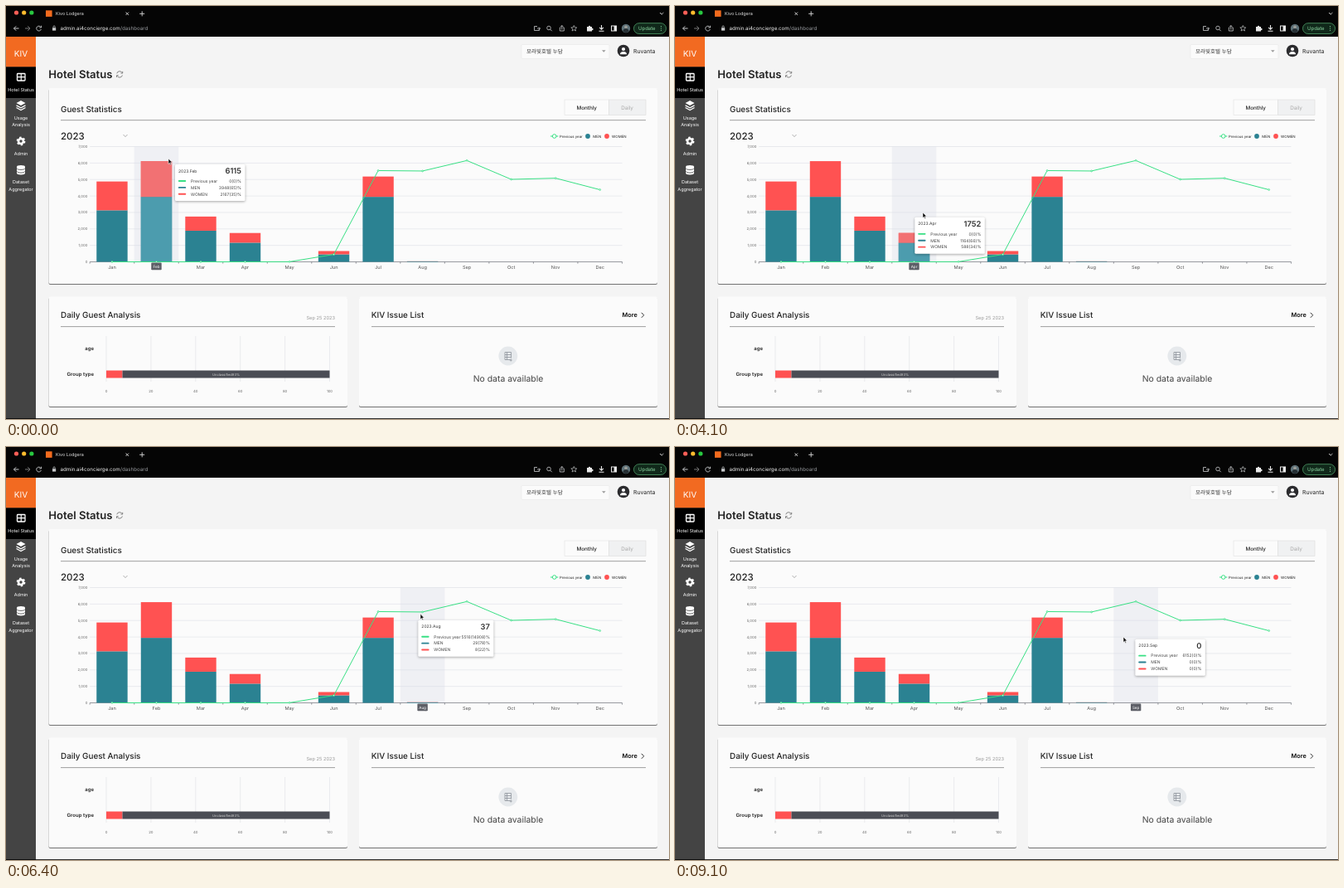
An HTML page that plays this animation: 800x498 px, repeating every 9200 ms.

```html
<!DOCTYPE html>
<html lang="en">
<head>
<meta charset="utf-8">
<title>Dashboard</title>
<style>
html, body { margin: 0; width: 100%; height: 100%; overflow: hidden; background: #f4f4f4; }
svg { display: block; width: 100vw; height: 100vh; font-family: Inter, "Noto Sans CJK KR", "Noto Sans CJK", sans-serif; }
text { white-space: pre; text-rendering: geometricPrecision; }
.card { fill: #fbfbfb; filter: drop-shadow(.8px 1px .6px #0008); }
.tip { fill: #fff; filter: drop-shadow(.5px 1px 1.5px #0005); }
</style>
</head>
<body>
<svg id="stage" viewBox="0 0 800 498"><g id="page"></g><g id="live"></g></svg>
<script>
const MONTHS = 'Jan Feb Mar Apr May Jun Jul Aug Sep Oct Nov Dec'.split(' ');
const PREV = [0, 0, 0, 0, 5, 450, 5541, 5516, 6152, 5009, 5080, 4380];
const MEN = [3130, 3948, 1890, 1164, 0, 455, 3947, 29, 0, 0, 0, 0];
const WOMEN = [1750, 2167, 860, 588, 0, 200, 1234, 8, 0, 0, 0, 0];
const GREEN = '#38e084', TEAL = '#2b8292', RED = '#ff5252';
const LEFT = 101.2, STEP = 53.52, BASE = 308.5, HALF = 18.7;
const LOOP = 9200, TICK = 100;

// pointer path: time, x, y
const PATH = [
  [0, 196, 184], [1200, 187, 200], [2300, 190, 215], [2900, 192, 240], [3400, 206, 243],
  [4100, 299, 249], [4700, 365, 246], [5350, 422, 241], [5490, 424.3, 240.8], [5500, 429, 240],
  [6100, 476, 202], [6400, 500, 201.3], [7000, 548, 200], [7400, 567, 191.5], [7700, 580.5, 197],
  [7730, 582, 200.5], [7800, 583, 201], [8250, 596, 214], [8700, 560, 216], [9100, 541, 229]
];

const $ = id => document.getElementById(id);
const rect = (x, y, w, h, fill, extra = '') =>
  `<rect x="${x}" y="${y}" width="${w}" height="${h}" fill="${fill}" ${extra}/>`;
const circle = (x, y, r, fill, extra = '') => `<circle cx="${x}" cy="${y}" r="${r}" fill="${fill}" ${extra}/>`;
const stroke = (d, color, width = 1, extra = '') =>
  `<path d="${d}" fill="none" stroke="${color}" stroke-width="${width}" ${extra}/>`;
const shape = (d, fill, extra = '') => `<path d="${d}" fill="${fill}" ${extra}/>`;
const text = (s, x, y, size, fill = '#222', anchor = 'start', weight = 400) =>
  `<text x="${x}" y="${y}" font-size="${size}" fill="${fill}" text-anchor="${anchor}" font-weight="${weight}">${s}</text>`;
const at = (x, y, body) => `<g transform="translate(${x} ${y})">${body}</g>`;
const cx = i => LEFT + STEP * (i + .5);
const yOf = v => BASE - v * 139 / 7000;

function browser() {
  const icon = '#c8cacc';
  let s = rect(0, 0, 800, 37, '#050505');
  ['#ff5f57', '#febc2e', '#28c840'].forEach((c, i) => s += circle(12.5 + 9.2 * i, 8, 2.6, c));
  s += rect(48, 5.3, 7.6, 7.6, '#f26b1d') + text('Kivo Lodgera', 60, 11.2, 5.4, '#e4e4e4');
  s += stroke('M144.6 7.6l3.4 3.4m0-3.4l-3.4 3.4M161.2 9.3h6m-3-3v6M789 8l2.2 2.2L793.4 8', '#ddd', .9);
  s += stroke('M15.5 27h-6m2.7-2.7L9.5 27l2.7 2.7', icon, 1);
  s += stroke('M23 27h6m-2.7-2.7L29 27l-2.7 2.7', '#777', 1);
  s += stroke('M42.1 25.5a2.9 2.9 0 1 0 .3 2.5M42.6 23.7v2.3h-2.3', icon, .9);
  s += rect(56, 26.2, 4.2, 3.4, icon) + stroke('M57 26v-1a1.1 1.1 0 0 1 2.2 0v1', icon, .7);
  s += text('admin.ai4concierge.com<tspan fill="#9a9da1">/dashboard</tspan>', 65.5, 29.3, 6.2, '#f2f2f2');
  s += stroke('M641 24.5h-3.5v5h6v-2M641 27h3.5m-1.5-1.5l1.5 1.5l-1.5 1.5', icon, .8);
  s += circle(655, 26.5, 2.3, 'none', `stroke="${icon}" stroke-width=".8"`) + stroke('M656.7 28.2l2 2', icon, .9);
  s += stroke('M669.5 26h-1.2v4h5v-4H672M670.8 28.5v-5m-1.5 1.5l1.5-1.5l1.5 1.5', icon, .8);
  s += stroke('M685.3 23.5l1 2.3 2.5.2-1.9 1.6.6 2.4-2.2-1.3-2.2 1.3.6-2.4-1.9-1.6 2.5-.2z', icon, .7);
  s += shape('M701 25h1.8a1.2 1.2 0 1 1 2.4 0H707v1.8a1.2 1.2 0 1 1 0 2.3V30.5h-6z', '#e8e8e8');
  s += stroke('M718.5 23v5m-2.3-2l2.3 2.3 2.3-2.3M715.5 30.3h6', '#e8e8e8', 1.1);
  s += rect(730.5, 24, 6, 6, 'none', 'stroke="#e8e8e8"') + rect(733.6, 24, 3, 6, '#e8e8e8');
  s += circle(748, 27, 5.2, '#5d7178') + shape('M744.3 30.6q.8-3.6 3.7-3.6t3.7 3.6q-3.7 3-7.4 0z', '#252e33') + circle(748, 25.3, 1.9, '#9a9c97');
  s += rect(757.5, 20.7, 39, 12.8, '#10281a', 'rx="6.4" stroke="#4f9c68" stroke-width=".8"') + text('Update', 763, 29.2, 6, '#8ad6a0');
  for (const y of [24.7, 27, 29.3]) s += circle(790.5, y, .6, '#8ad6a0');
  return s;
}

function sidebar() {
  const label = (s, y) => text(s, 18, y, 5.5, '#fff', 'middle');
  let s = rect(0, 37, 36, 461, '#444') + rect(0, 37, 36, 36.5, '#f26a21') + text('KIV', 18, 60.7, 10, '#fff', 'middle');
  s += rect(0, 73.5, 36, 37.5, '#000') + rect(13.5, 81.5, 9.5, 8.5, 'none', 'stroke="#fff" stroke-width="1.3" rx=".8"');
  s += stroke('M18.25 81.5v8.5M13.5 85.7h9.5', '#fff', 1.2) + label('Hotel Status', 102.5);
  s += shape('M18 114l5.5 3-5.5 3-5.5-3z', '#fff') + stroke('M12.5 119.8l5.5 3 5.5-3M12.5 122.5l5.5 3 5.5-3', '#fff', 1.4);
  s += label('Usage', 136.8) + label('Analysis', 145.3);
  s += circle(18, 163, 3, 'none', 'stroke="#fff" stroke-width="2.6"')
    + circle(18, 163, 4.6, 'none', 'stroke="#fff" stroke-width="1.6" stroke-dasharray="2.4 2.417"') + label('Admin', 180);
  s += shape('M13 194a5 1.9 0 0 1 10 0v7.5a5 1.9 0 0 1-10 0z', '#fff')
    + stroke('M13 195.6a5 1.9 0 0 0 10 0M13 199.2a5 1.9 0 0 0 10 0', '#444', .8);
  return s + label('Dataset', 214) + label('Aggregator', 222.5);
}

function cards() {
  const card = (x, y, w, h) => rect(x, y, w, h, '#fbfbfb', 'rx="2" class="card"');
  const title = (s, x, y) => text(s, x, y, 9.9, '#222', 'start', 500);
  let s = rect(622, 46.5, 106, 17, '#fbfbfb', 'rx="1" stroke="#eaeaea" stroke-width=".6"') + text('모라빛호텔 누담', 628, 57, 6.5, '#333');
  s += shape('M719 53.2h4.6l-2.3 2.6z', '#999');
  s += circle(745, 54, 7.3, '#2b2b2e') + circle(745, 52, 2.1, '#fff') + shape('M740.9 58.3q.4-3.3 4.1-3.3t4.1 3.3z', '#fff');
  s += text('Ruvanta', 757, 56.8, 6.9);
  s += text('Hotel Status', 51.2, 87.3, 13.1, '#222', 'start', 600);
  s += stroke('M133.8 81.3a3.4 3.4 0 0 1 6.3-.8m.6-1.6v2.2h-2.2M140.4 83.5a3.4 3.4 0 0 1-6.3.8m-.6 1.6v-2.2h2.2', '#666', .8);

  s += card(51.5, 99, 734.5, 236) + title('Guest Statistics', 66, 127.8);
  s += rect(674, 113, 53.5, 18.5, '#fbfbfb', 'stroke="#e4e4e4" stroke-width=".7"')
    + rect(727.5, 113, 44.5, 18.5, '#f0f1f2', 'stroke="#e0e0e0" stroke-width=".7"');
  s += text('Monthly', 700.7, 124.6, 6.3, '#222', 'middle', 500) + text('Daily', 749.5, 124.6, 6.3, '#aaa', 'middle');
  s += stroke('M66 137.7H772', '#888', .8);
  s += text('2023', 66, 161, 11.5, '#222', 'start', 500) + stroke('M141.5 155l2.5 2.7 2.5-2.7', '#aaa', .9);
  s += stroke('M657 157h9.4', GREEN) + circle(661.7, 157, 2.3, '#fff', `stroke="${GREEN}"`) + text('Previous year', 668, 158.6, 4.3);
  s += circle(702, 157, 2.9, TEAL) + text('MEN', 708.3, 158.6, 4.4) + circle(725, 157, 2.9, RED) + text('WOMEN', 731, 158.6, 4.4);

  s += card(51.5, 350.5, 360.5, 132.5) + title('Daily Guest Analysis', 66, 376.4);
  s += text('Sep 25 2023', 397, 378.4, 5.7, '#999', 'end') + stroke('M66 386.6H397', '#888', .8);
  s += text('age', 106, 415, 6, '#222', 'end', 600) + text('Group type', 106, 446, 6, '#222', 'end', 600);
  for (let i = 0; i < 6; i++) {
    const x = 121 + 53.9 * i;
    s += stroke(`M${x} 398V453`, '#e2e4e8', .7) + text(20 * i, x, 466, 4.3, '#666', 'middle');
  }
  s += rect(121, 439.5, 19.5, 9, RED) + rect(140.5, 439.5, 250, 9, '#4b4d55');
  s += text('Unclassified93%', 265.5, 445.6, 4.1, '#ccc', 'middle');

  s += card(426, 350.5, 360, 132.5) + title('KIV Issue List', 440.7, 376.4);
  s += text('More', 743.5, 375.2, 7.3, '#111', 'start', 600) + stroke('M766.8 369.8l2.9 3-2.9 3', '#222', .9);
  s += stroke('M441 386.6H772', '#888', .8) + circle(605.8, 422, 11.4, '#e6e9ec');
  s += stroke('M608.5 426.5h-6.5v-9h7.5v7M602 420.5h7.5M602 423.5h7.5M604.5 417.5v9M609.2 425.5v3m-1.5-1.5h3', '#8d949b', .8);
  s += text('No data available', 606, 453.4, 10.4, '#444', 'middle');
  return s + rect(0, 497.2, 800, .8, '#000');
}

function pointer(t) {
  const k = Math.max(1, PATH.findIndex(p => p[0] >= t));
  const [a, b] = [PATH[k - 1], PATH[k]];
  const f = (t - a[0]) / (b[0] - a[0]);
  return [a[1] + (b[1] - a[1]) * f, a[2] + (b[2] - a[2]) * f];
}

const monthAt = t => Math.min(11, Math.max(0, Math.floor((pointer(t)[0] - LEFT) / STEP)));

// hovered series: 0 line, 1 men, 2 women, -1 none
function hover(t) {
  const [x, y] = pointer(t);
  for (let i = 0; i < 11; i++) {
    if (x < cx(i) || x > cx(i + 1)) continue;
    const slope = (yOf(PREV[i + 1]) - yOf(PREV[i])) / STEP;
    const gap = y - yOf(PREV[i]) - slope * (x - cx(i));
    if (Math.abs(gap) / Math.hypot(1, slope) < 2) return 0;
  }
  const i = monthAt(t);
  if (Math.abs(x - cx(i)) > HALF || y > BASE) return -1;
  return y > yOf(MEN[i]) ? 1 : y > yOf(MEN[i] + WOMEN[i]) ? 2 : -1;
}

// value that follows f with an ease-out of the given span
function eased(t, span, f) {
  const n = 40;
  let sum = 0;
  for (let k = 0; k < n; k++) sum += f(Math.max(0, t - span * (1 - Math.sqrt(1 - (k + .5) / n))));
  return sum / n;
}

function chart(t) {
  const mid = cx(eased(t, 200, monthAt));
  const series = (k, body) => `<g opacity="${eased(t, 300, u => [-1, k].includes(hover(u)) ? 1 : .1)}">${body}</g>`;
  let s = '', men = '', women = '', dots = '', labels = '';
  for (let v = 0; v <= 7000; v += 1000) {
    if (v) s += stroke(`M${LEFT} ${yOf(v)}H743.5`, '#e0e3e9', .7);
    s += text(v.toLocaleString('en-US'), 98.5, yOf(v) + 1.5, 4.3, '#666', 'end');
  }
  s += rect(mid - STEP / 2, 169.5, STEP, 139, '#d6dbe6', 'opacity=".35"');
  MONTHS.forEach((m, i) => {
    const lift = eased(t, 300, u => monthAt(u) === i ? 1 : 0);
    const bar = (from, to, base, light) => {
      const box = [cx(i) - HALF, yOf(to), 2 * HALF, yOf(from) - yOf(to)];
      return rect(...box, base) + rect(...box, light, `opacity="${lift}"`);
    };
    men += bar(0, MEN[i], TEAL, '#4c9cae');
    women += bar(MEN[i], MEN[i] + WOMEN[i], RED, '#f27173');
    dots += circle(cx(i), yOf(PREV[i]), .9, '#fff', `stroke="${GREEN}" stroke-width=".8"`);
    labels += text(m, cx(i), 317, 5.6, '#555', 'middle');
  });
  const ticks = Array.from({ length: 13 }, (_, i) => `M${LEFT + STEP * i} ${BASE}v2.2`).join('');
  const line = 'M' + PREV.map((v, i) => `${cx(i)} ${yOf(v)}`).join('L');
  return s + labels + stroke(`M${LEFT} ${BASE}H743.5${ticks}`, '#6e7079', .7)
    + series(1, men) + series(2, women) + series(0, stroke(line, GREEN) + dots)
    + rect(mid - 6.2, 309.6, 12.4, 8.6, '#5c5e66', 'rx=".8"')
    + text(MONTHS[monthAt(t)], mid, 315.6, 4.6, '#fff', 'middle');
}

function tooltip(t) {
  const i = monthAt(t), total = MEN[i] + WOMEN[i];
  const rows = [['Previous year', PREV[i], GREEN], ['MEN', MEN[i], TEAL], ['WOMEN', WOMEN[i], RED]]
    .map(([name, v, color]) => [name, `${v}(${total ? Math.round(v / total * 100) : 0})%`, color]);
  const w = Math.max(84.5, 67 + 2 * rows[0][1].length), right = w - 4.5;
  let s = rect(0, 0, w, 44, '#fff', 'rx="1.5" class="tip"') + text(`2023.${MONTHS[i]}`, 4, 9.6, 5, '#333');
  s += text(total, right, 11, 9.3, '#333', 'end', 600);
  rows.forEach(([name, value, color], k) => {
    const y = 20 + 7.9 * k;
    s += stroke(`M4.8 ${y}h7.5`, color, 1.9, 'stroke-linecap="round"')
      + text(name, 19, y + 1.8, 5, '#444') + text(value, right, y + 1.8, 5, '#444', 'end');
  });
  return at(eased(t, 400, u => pointer(u)[0]) + 8, eased(t, 400, u => pointer(u)[1]) + 7, s);
}

function cursor(t) {
  const hand = 'M-1 3V-2.5q.8-1 1.5 0V.3l3 .7q1 .3.8 1.5L3.7 5H.2L-2.4 1.8q.3-1 1.4 0z';
  const arrow = 'M0 0V6.5l1.5-1.3 1 2.2 1-.4-1-2.2h2z';
  const body = hover(t) < 0 ? shape(arrow, '#000', 'stroke="#fff" stroke-width=".6"')
    : shape(hand, '#fff', 'stroke="#111" stroke-width=".8"');
  return at(...pointer(t), body);
}

$('page').innerHTML = browser() + sidebar() + cards();
let shown = -1;
function frame() {
  const t = Math.floor(performance.now() % LOOP / TICK) * TICK;
  if (t !== shown) $('live').innerHTML = chart(t) + tooltip(t) + cursor(t);
  shown = t;
  requestAnimationFrame(frame);
}
frame();
</script>
</body>
</html>
```
